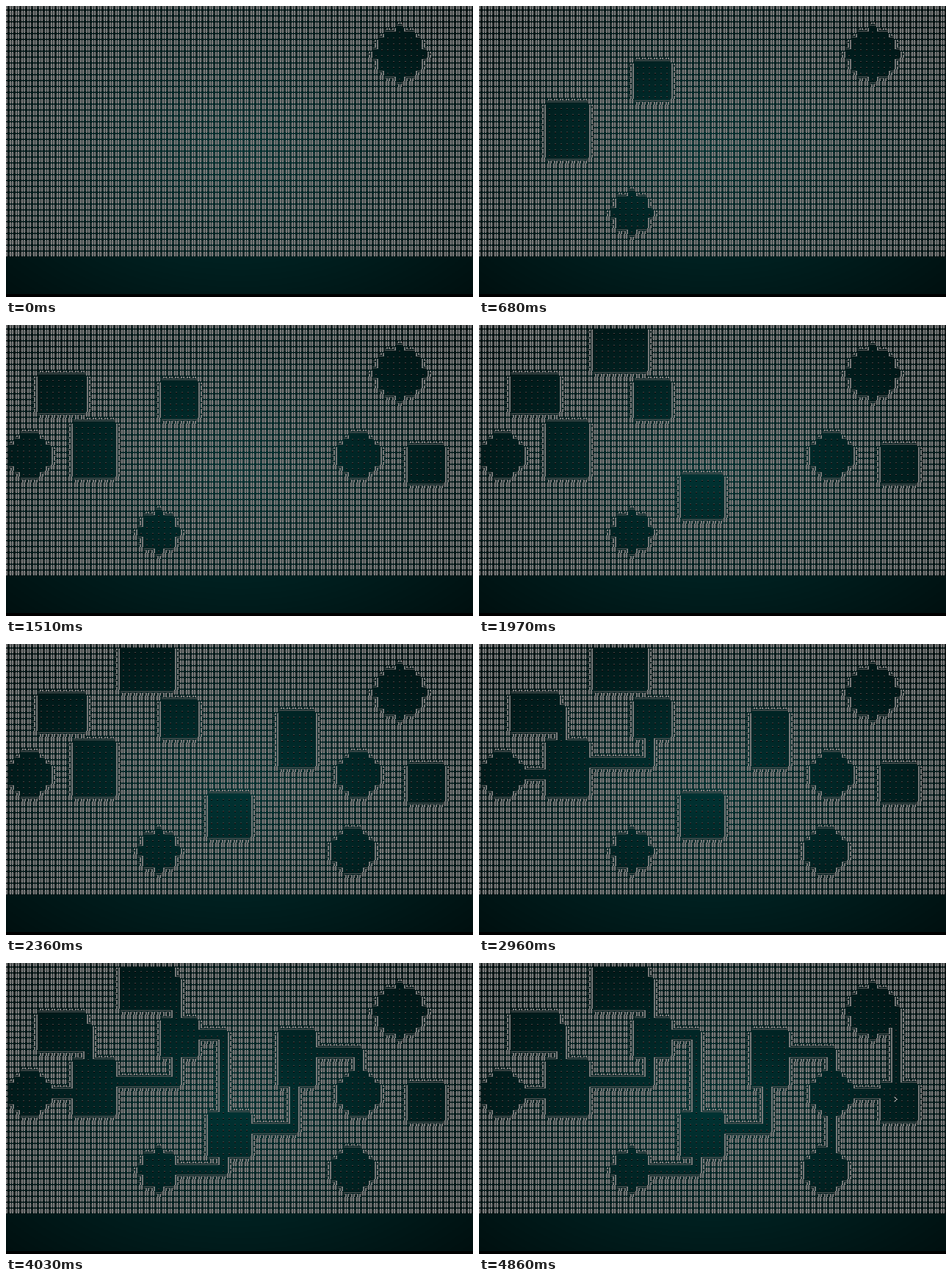
Animation, 636 px wide and 396 px high, one loop 5020 ms. Source, as an HTML page with a canvas:

```html
<!DOCTYPE html>
<html>
<head>
<meta charset="utf-8">
<style>
html, body { margin: 0; width: 100%; height: 100%; overflow: hidden; background: #000; }
canvas { display: block; }
</style>
</head>
<body>
<canvas id="stage" width="636" height="396"></canvas>
<script>
const W = 636, H = 396, LOOP = 5020;
const COLS = 80, ROWS = 43, CELL = 8;
const LEFT = 4, TOP = 2;          // part of the 640 x 400 screen that is cut off
const BOTTOM = 392;               // black strip below this line
const WALL = 0.7152, FLOOR = 0.3937, STAIRS = 0.7874;

const ctx = document.getElementById('stage').getContext('2d');
const image = ctx.createImageData(W, H);
let map;

const at = (x, y) => map[y * COLS + x];
const dig = (x, y, tile = '.') => { map[y * COLS + x] = tile; };

const room = (x1, y1, x2, y2) => () => {
  for (let y = y1; y <= y2; y++)
    for (let x = x1; x <= x2; x++) dig(x, y);
};

const disc = (cx, cy, radius) => () => {
  for (let y = -4; y <= 4; y++)
    for (let x = -4; x <= 4; x++)
      if (Math.hypot(x, y) <= radius) dig(cx + x, cy + y);
};

// L-shaped tunnel: along row y, and along column x
const tunnel = (x, y, endX, endY) => () => {
  room(Math.min(x, endX), y, Math.max(x, endX), y)();
  room(x, Math.min(y, endY), x, Math.max(y, endY))();
};

const steps = [
  [0, disc(67, 8, 4)],
  [290, room(12, 17, 18, 25)],
  [450, disc(26, 35, 3)],
  [680, room(27, 10, 32, 15)],
  [910, disc(4, 22, 3.5)],
  [1050, room(6, 9, 13, 14)],
  [1280, disc(60, 22, 3.5)],
  [1510, room(69, 21, 74, 26)],
  [1740, room(35, 26, 41, 32)],
  [1970, room(20, 1, 28, 7)],
  [2130, room(47, 12, 52, 20)],
  [2360, disc(59, 35, 3.5)],
  [2500, tunnel(14, 22, 4, 20)],
  [2750, tunnel(14, 11, 9, 20)],
  [2960, tunnel(29, 20, 14, 12)],
  [3120, tunnel(29, 3, 23, 12)],
  [3350, tunnel(37, 35, 26, 28)],
  [3580, tunnel(37, 12, 29, 28)],
  [3800, tunnel(49, 28, 37, 15)],
  [4030, tunnel(60, 15, 49, 22)],
  [4170, tunnel(60, 35, 59, 22)],
  [4400, tunnel(71, 22, 60, 23)],
  [4630, tunnel(71, 8, 67, 23)],
  [4860, () => dig(71, 23, '>')]
];

// Neighbouring walls as bits: north 1, south 2, west 4, east 8
function wallMask(x, y) {
  if (x < 1 || y < 1 || x > COLS - 2 || y > ROWS - 2) return 15;
  const wall = (dx, dy, bit) => at(x + dx, y + dy) === '#' ? bit : 0;
  return wall(0, -1, 1) | wall(0, 1, 2) | wall(-1, 0, 4) | wall(1, 0, 8);
}

function hashPixel(c, r) {
  return r < 7 && c < 7 && (r === 2 || r === 4 || c === 1 || c === 2 || c === 4 || c === 5);
}

// Double-line box character with an arm for each bit of the mask
function boxPixel(mask, c, r) {
  const n = mask & 1, s = mask & 2, w = mask & 4, e = mask & 8;
  const midC = c > 1 && c < 7, midR = r > 1 && r < 5;
  const body = midC && (midR || (r < 2 ? n : s)) || midR && (c < 2 ? w : c > 6 && e);
  const gap = c === 4 && (r === 3 || (r < 3 ? n : s)) ||
              r === 3 && (c < 4 ? w : c > 4 && e);
  return body && !gap;
}

function pixel(tile, mask, c, r) {
  if (tile === '.') return (c === 3 || c === 4) && (r === 5 || r === 6) ? FLOOR : 0;
  if (tile === '>') {
    const start = 4 - Math.abs(3 - r);
    return r < 7 && (c === start || c === start + 1) ? STAIRS : 0;
  }
  return (mask === 15 ? hashPixel(c, r) : boxPixel(mask, c, r)) ? WALL : 0;
}

function put(x, y, r, g, b) {
  if (x < 0 || y < 0 || x >= W || y >= H) return;
  image.data.set([r, g, b, 255], (y * W + x) * 4);
}

function draw(count) {
  map = Array(COLS * ROWS).fill('#');
  for (const [, build] of steps.slice(0, count)) build();

  // Screen glow, brightest in the middle
  for (let y = 0; y < H; y++)
    for (let x = 0; x < W; x++) {
      const d = Math.hypot((x + LEFT + 0.5) / 640 - 0.5, (y + TOP + 0.5) / 400 - 0.5);
      const glow = y < BOTTOM ? Math.round(51 * (1 - d)) : 0;
      put(x, y, 0, glow, glow);
    }

  // Characters with scanlines
  for (let y = 0; y < ROWS; y++)
    for (let x = 0; x < COLS; x++) {
      const tile = at(x, y), mask = wallMask(x, y);
      for (let r = 0; r < CELL; r++)
        for (let c = 0; c < CELL; c++) {
          const light = pixel(tile, mask, c, r);
          if (!light) continue;
          const v = Math.round(255 * (light - (r % 2 ? 0.125 : 0.375)));
          put(x * CELL + c - LEFT, y * CELL + r - TOP, v, v, v);
        }
    }
  ctx.putImageData(image, 0, 0);
}

let shown = 0;
const begin = performance.now();
function tick() {
  const t = Math.max(0, performance.now() - begin) % LOOP;
  const count = steps.filter(([time]) => time <= t).length;
  if (count !== shown) draw(shown = count);
  requestAnimationFrame(tick);
}
tick();
</script>
</body>
</html>
```
